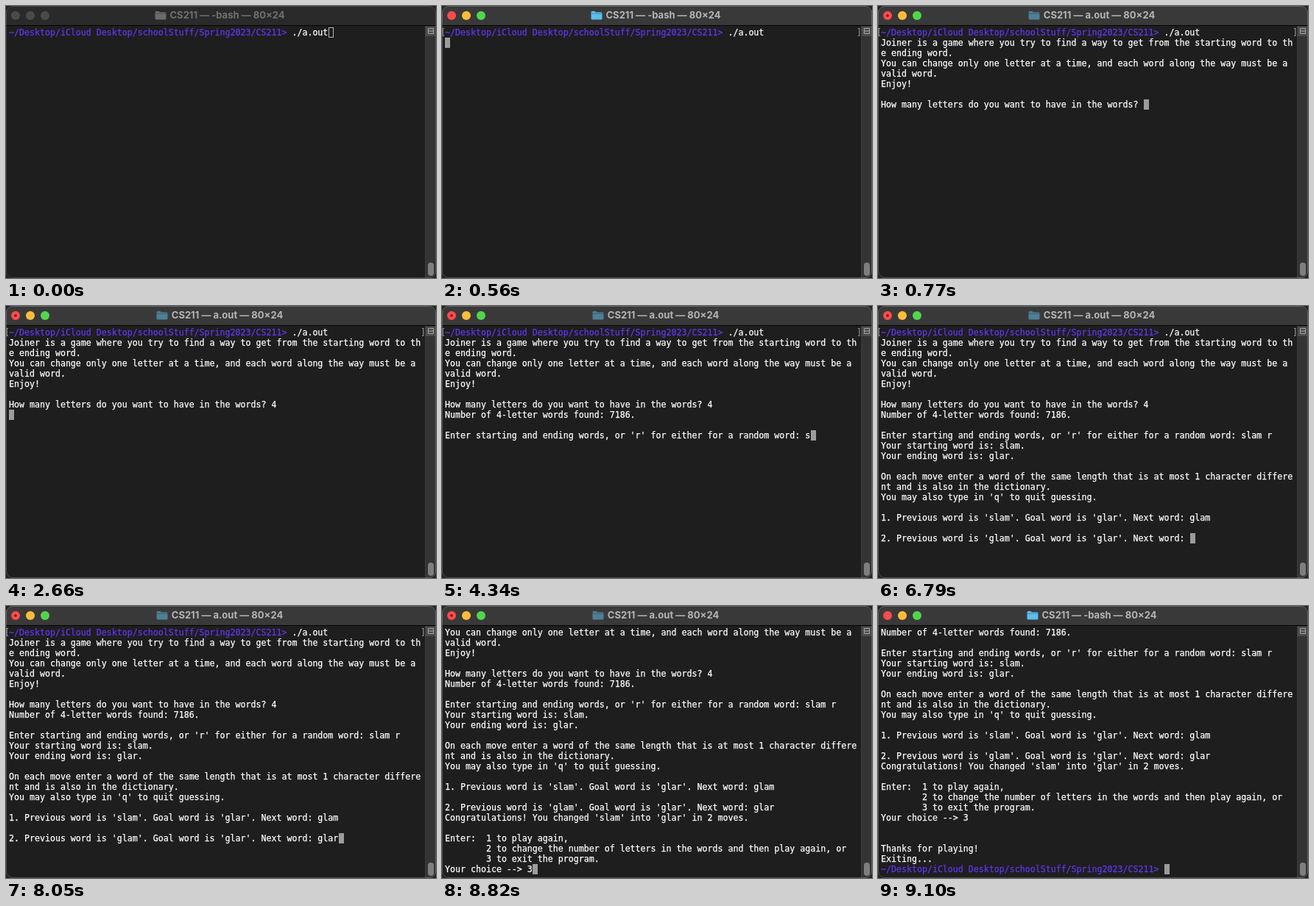
Animation of 584x370 px, one loop 9.94 s. Source, as an HTML page:

```html
<!DOCTYPE html>
<html lang="en">
<head>
<meta charset="utf-8">
<style>
  html, body { margin: 0; width: 100%; height: 100%; overflow: hidden; background: #222; }
  svg { display: block; }
  text { white-space: pre; }
  #rows, .mark { font: 11.627px "DejaVu Sans Mono", "Noto Sans Mono", monospace; }
  #rows { fill: #fff; stroke: #fff; stroke-width: .25px; }
  #rows tspan { fill: #6236ee; stroke: #6236ee; }
  .mark { fill: #a2a2a2; }
  #title { font: 700 13px Inter, "Open Sans", sans-serif; text-anchor: middle; }
</style>
</head>
<body>
<svg width="584" height="370" viewBox="0 0 584 370">
  <clipPath id="win"><rect width="584" height="370" rx="9"/></clipPath>
  <g clip-path="url(#win)">
    <rect width="584" height="370" fill="#1e1e1e"/>
    <rect id="bar" width="584" height="26"/>
    <rect y="26" width="584" height="1" fill="#050505"/>
    <rect x="569" y="27" width="15" height="343" fill="#343434"/>
    <rect x="569" y="27" width="1" height="343" fill="#3c3c3c"/>
    <rect x="570" y="28" width="13" height="13" fill="#4c4c4c"/>
    <path d="M573.5 30.5h7v7h-7zM573.5 34h7" fill="none" stroke="#a5a5a5"/>
    <rect x="573" y="349" width="8" height="18" rx="4" fill="#7e7e7e"/>
  </g>
  <rect id="edge" x=".5" y=".5" width="583" height="369" rx="8.5" fill="none" stroke="#fff"/>
  <g id="lights">
    <circle cx="13" cy="13" r="6"/>
    <circle cx="33" cy="13" r="6"/>
    <circle cx="53" cy="13" r="6"/>
  </g>
  <circle id="dot" cx="13" cy="13" r="1.8" fill="#7d0f0c"/>
  <g id="folder">
    <path d="M0 2q0-1.5 1.5-1.5h3.3l1.6 1.5h7.1q1.5 0 1.5 1.5v7q0 1.5-1.5 1.5h-12q-1.5 0-1.5-1.5z"/>
    <path d="M0 3.8h15" stroke="#000" stroke-opacity=".25"/>
  </g>
  <text id="title" x="300.5" y="17"></text>
  <rect id="cursor"/>
  <g id="marks">
    <text class="mark" x="-2" y="40">[</text>
    <text class="mark" x="563" y="40">]</text>
  </g>
  <g id="rows"></g>
</svg>
<script>
const LOOP = 9940, ROWS = 24, CELL = 7, LINE = 14, LEFT = 4, TOP = 29;
const PATH = "~/Desktop/iCloud Desktop/schoolStuff/Spring2023/CS211>";
const ask = (n, word) => `${n}. Previous word is '${word}'. Goal word is 'glar'. Next word: `;

// [time, text written to the terminal]
const log = [
  [0, PATH + " ./a.out"],
  [560, "\n"],
  [630, `Joiner is a game where you try to find a way to get from the starting word to th
e ending word.
You can change only one letter at a time, and each word along the way must be a
valid word.
Enjoy!

How many letters do you want to have in the words? `],
  [2520, "4"],
  [2660, "\n"],
  [2730, `Number of 4-letter words found: 7186.

Enter starting and ending words, or 'r' for either for a random word: `],
  [4340, "s"], [4480, "l"], [4550, "a"], [4690, "m"], [4900, " "], [5040, "r"],
  [5110, `
Your starting word is: slam.
Your ending word is: glar.

On each move enter a word of the same length that is at most 1 character differe
nt and is also in the dictionary.
You may also type in 'q' to quit guessing.

` + ask(1, "slam")],
  [6230, "g"], [6300, "l"], [6510, "a"], [6580, "m"],
  [6790, "\n\n" + ask(2, "glam")],
  [7630, "g"], [7700, "l"], [7770, "a"], [8050, "r"],
  [8120, `
Congratulations! You changed 'slam' into 'glar' in 2 moves.

Enter:  1 to play again,
        2 to change the number of letters in the words and then play again, or
        3 to exit the program.
Your choice --> `],
  [8820, "3"],
  [8960, "\n"],
  [9030, `

Thanks for playing!
Exiting...
${PATH} `]
];

const $ = id => document.getElementById(id);
const set = (el, attrs) => { for (const k in attrs) el.setAttribute(k, attrs[k]); };
const show = (el, on) => set(el, { visibility: on ? "visible" : "hidden" });

const rows = Array.from({ length: ROWS }, (_, i) => {
  const row = document.createElementNS("http://www.w3.org/2000/svg", "text");
  set(row, { x: LEFT, y: TOP + 11 + i * LINE });
  return $("rows").appendChild(row);
});

function drawText(t, active) {
  const lines = log.filter(e => e[0] <= t).map(e => e[1]).join("").split("\n");
  const view = lines.slice(-ROWS);
  rows.forEach((row, i) => {
    const html = (view[i] || "").replace(PATH, `<tspan>${PATH.replace(">", "&gt;")}</tspan>`);
    if (row.last !== html) row.innerHTML = row.last = html;
  });
  show($("marks"), t >= 560 && lines.length <= ROWS);

  const x = LEFT + view[view.length - 1].length * CELL;
  const y = TOP + (view.length - 1) * LINE;
  set($("cursor"), active
    ? { x, y, width: 7, height: 14, fill: "#9c9c9c", stroke: "none" }
    : { x: x + .5, y: y + .5, width: 6, height: 13, fill: "none", stroke: "#b4b4b4" });
}

function drawChrome(t, active) {
  const running = t >= 700 && t < 9100;
  const dim = t >= 770 && t < 9100;
  set($("bar"), { fill: active ? "#3a393a" : "#2b2a2b" });
  set($("edge"), { "stroke-opacity": active ? .2 : .12 });
  const colors = active ? ["#fe4c4c", "#fdbd3a", "#50d64c"] : Array(3).fill("#4b4a4b");
  [...$("lights").children].forEach((c, i) => set(c, { fill: colors[i] }));
  show($("dot"), running);
  set($("title"), { fill: active ? "#b6b5b6" : "#717071" });
  $("title").textContent = `CS211 — ${running ? "a.out" : "-bash"} — 80×24`;
  set($("folder"), {
    transform: `translate(${running ? 204.5 : 202.5} 6.5)`,
    fill: !active ? "#6c6b6c" : dim ? "#4e7f95" : "#5cbdec"
  });
}

function frame(now) {
  const t = now % LOOP, active = t >= 70;
  drawText(t, active);
  drawChrome(t, active);
  requestAnimationFrame(frame);
}
frame(performance.now());
</script>
</body>
</html>
```
